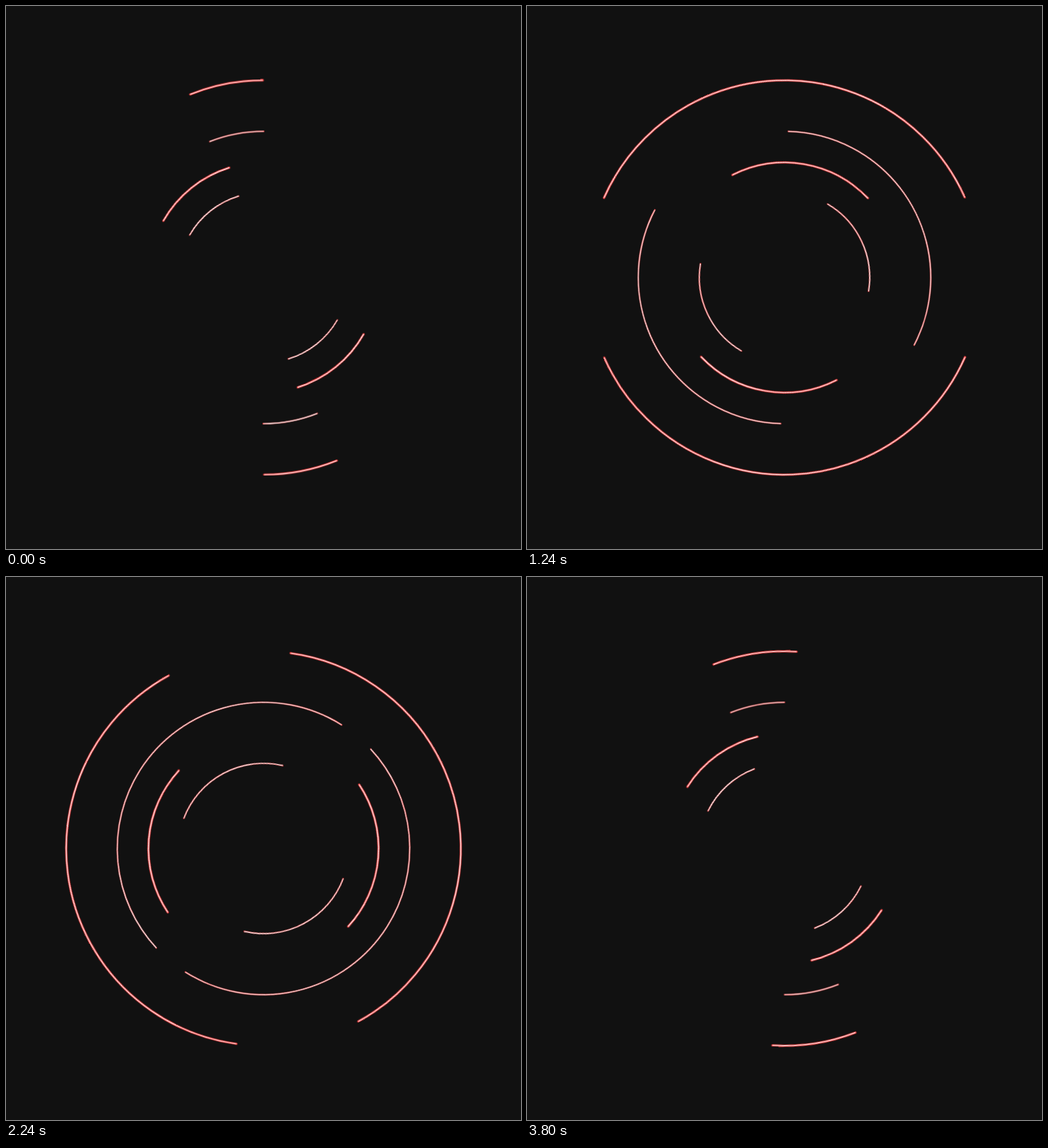
An HTML page that plays this animation: 729x769 px, repeating every 3.84 s.

```html
<!DOCTYPE html>
<html lang="en">
<head>
<meta charset="utf-8">
<title>Orbiting arcs</title>
<style>
  html, body { margin: 0; width: 100%; height: 100%; overflow: hidden; background: #111; }
  svg { display: block; width: 729px; height: 769px; }

  .ring { transform-origin: 0 0; animation: turn 3840ms linear infinite; }
  .outer { animation-name: turn-rest; }
  .ring circle { fill: none; animation: narrow 3840ms linear infinite; }
  .outer circle { animation-name: wide; }
  .back, .back circle { animation-direction: reverse; }

  .edge { stroke: #ff4343; stroke-width: 2; stroke-linecap: round; }
  .bold .edge { stroke-width: 3; }
  .core { stroke: #fff; stroke-width: 1.1; }

  @keyframes turn {
    from { transform: rotate(0deg); }
    to { transform: rotate(360deg); }
  }
  /* one full turn, then a short rest */
  @keyframes turn-rest {
    0% { transform: rotate(0deg); }
    98.9583%, 100% { transform: rotate(360deg); }
  }
  @keyframes wide {
    0%, 98.9583%, 100% { stroke-dasharray: 21.6px 158.4px; }
    54.1667% { stroke-dasharray: 180px 0px; }
  }
  @keyframes narrow {
    0%, 98.9583%, 100% { stroke-dasharray: 43.2px 136.8px; }
    54.1667% { stroke-dasharray: 86.4px 93.6px; }
  }
</style>
</head>
<body>
<!-- circles are mirrored so each dash grows counter-clockwise from its leading end -->
<svg viewBox="-364.5 -384.5 729 769">
  <g transform="rotate(-.2)">
    <g class="ring outer bold back">
      <circle class="edge" r="279.3" pathLength="360" transform="scale(-1 1) rotate(-90)"/>
      <circle class="core" r="279.3" pathLength="360" transform="scale(-1 1) rotate(-90)"/>
    </g>
  </g>
  <g class="ring outer">
    <circle class="edge" r="207" pathLength="360" transform="scale(-1 1) rotate(-90)"/>
    <circle class="core" r="207" pathLength="360" transform="scale(-1 1) rotate(-90)"/>
  </g>
  <g transform="rotate(-17.2)">
    <g class="ring bold back">
      <circle class="edge" r="162.9" pathLength="360" transform="scale(-1 1) rotate(-90)"/>
      <circle class="core" r="162.9" pathLength="360" transform="scale(-1 1) rotate(-90)"/>
    </g>
  </g>
  <g transform="rotate(-17)">
    <g class="ring">
      <circle class="edge" r="120.6" pathLength="360" transform="scale(-1 1) rotate(-90)"/>
      <circle class="core" r="120.6" pathLength="360" transform="scale(-1 1) rotate(-90)"/>
    </g>
  </g>
</svg>
</body>
</html>
```
